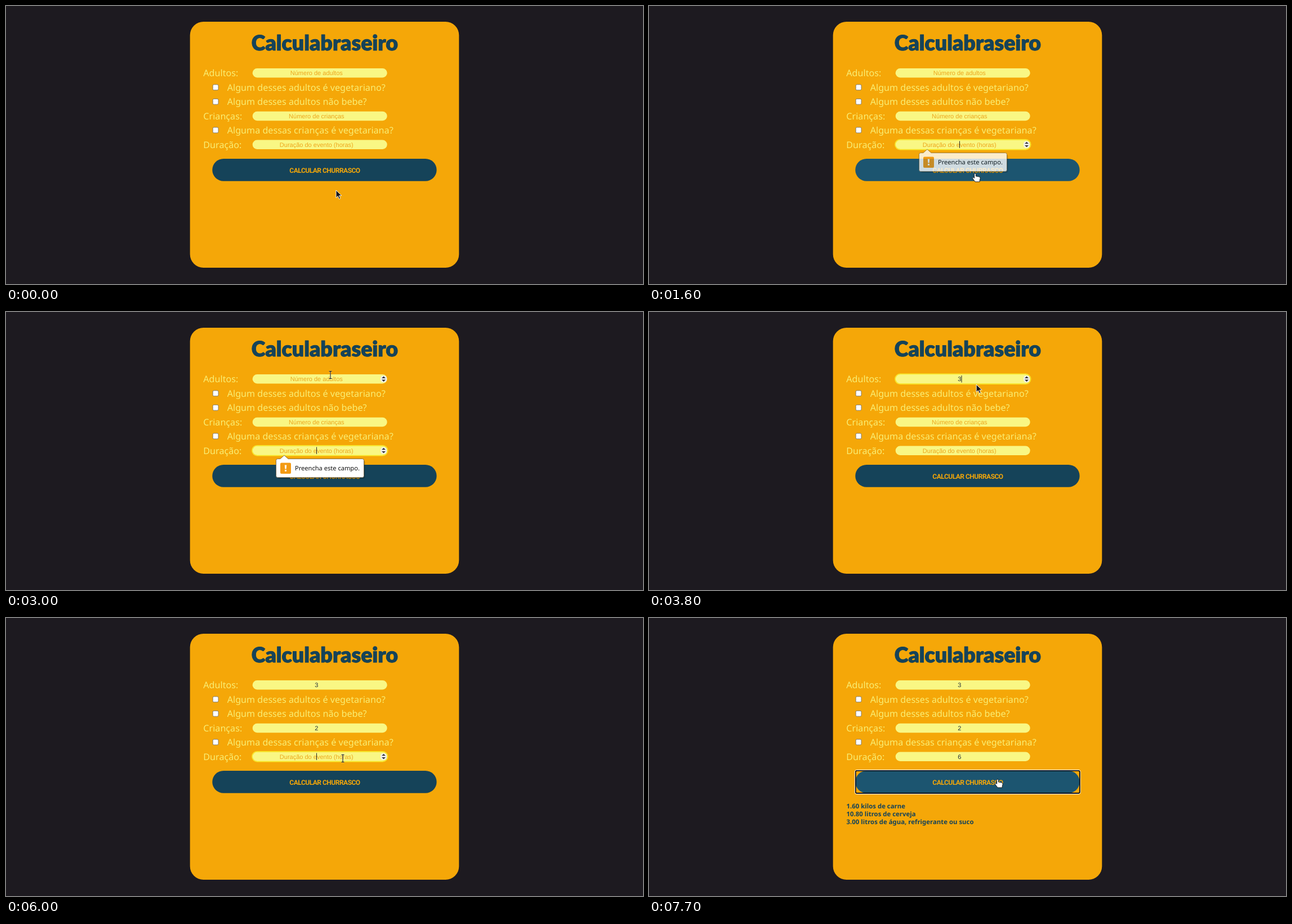
Animation of 1131 by 495 pixels, one loop 8 s. Source, as an HTML page:

```html
<!DOCTYPE html>
<html lang="pt">
<head>
<meta charset="utf-8">
<title>Calculabraseiro</title>
<style>
  html, body { margin: 0; width: 100%; height: 100%; overflow: hidden; background: #1d1a20; }
  svg { display: block; width: 100%; height: 100%; text-rendering: geometricPrecision; }
  .title { font: 900 37.5px Lato, sans-serif; fill: #154359; stroke: #154359; stroke-linejoin: round; text-anchor: middle; }
  .label { font: 16.15px "Noto Sans", sans-serif; fill: #f9ee74; }
  .value { font: 11px "Liberation Sans", Arial, sans-serif; text-anchor: middle; }
  .action { font: 700 12px Roboto, sans-serif; letter-spacing: -.5px; fill: #f5a708; text-anchor: middle; }
  .result { font: 700 11.4px "Noto Sans", sans-serif; fill: #154359; }
  .tip { font: 11.1px "Noto Sans", sans-serif; fill: #111; }
</style>
</head>
<body>
<svg viewBox="0 0 1131 495">
  <rect x="326.7" y="28" width="477.6" height="438" rx="24" fill="#f5a708"/>
  <text class="title" x="566" y="79">Calculabraseiro</text>
  <g id="form"></g>
  <rect id="button" x="366.3" y="272" width="398.3" height="39.8" rx="19.9"/>
  <text class="action" x="566" y="297">CALCULAR CHURRASCO</text>
  <g id="ring" fill="none">
    <rect x="365.5" y="270.5" width="400.5" height="43" rx="3" stroke="#fff"/>
    <rect x="366.8" y="271.8" width="398" height="40.2" rx="2.5" stroke="#101014" stroke-width="1.8"/>
  </g>
  <g id="results" class="result">
    <text x="350.5" y="339">1.60 kilos de carne</text>
    <text x="350.5" y="353">10.80 litros de cerveja</text>
    <text x="350.5" y="367">3.00 litros de água, refrigerante ou suco</text>
  </g>
  <g id="popup">
    <rect x="482" y="264" width="155.5" height="33" rx="4" opacity=".2"/>
    <path d="M482.5 261.5H487l7-6.3 7 6.3h131.5q3 0 3 3v27.2q0 3-3 3h-150q-3 0-3-3v-27.2q0-3 3-3z" fill="#fff" stroke="#6b5a3a" stroke-width=".8"/>
    <rect x="487" y="268.5" width="19" height="19.5" rx="2" fill="#f39a13"/>
    <path d="M494.8 272.5h3.4l-.6 7h-2.2zM495 281h3v2.8h-3z" fill="#fff"/>
    <text class="tip" x="513" y="282">Preencha este campo.</text>
  </g>
  <g id="cursor">
    <path id="arrow" d="M0 0V13.5l3.2-3 2.3 5.2 2.3-1-2.2-5H10z" fill="#16151a" stroke="#fff" stroke-width=".9"/>
    <path id="hand" d="M-1.4 1.2Q-1.2 0 0 0t1.4 1.5V5l5.8 1q2.2.5 2 3l-1 3.5V15H0l-4.4-6q-.8-1.8.8-2l2.2 1.4z" fill="#fff" stroke="#111" stroke-width=".9"/>
    <g id="beam" fill="none">
      <path d="M-2.5-6.5H2.5M0-6.5v13M-2.5 6.5H2.5" stroke="#fff" stroke-width="2.2" opacity=".5"/>
      <path d="M-2.5-6.5H2.5M0-6.5v13M-2.5 6.5H2.5" stroke="#111" stroke-width="1.1"/>
    </g>
  </g>
</svg>
<script>
const $ = id => document.getElementById(id);
const show = (el, on) => el.setAttribute('visibility', on ? 'visible' : 'hidden');
const within = (t, a, b) => t >= a && t < b;

const checks = [
  [144.8, 'Algum desses adultos é vegetariano?'],
  [170.3, 'Algum desses adultos não bebe?'],
  [221, 'Alguma dessas crianças é vegetariana?']
];
// y, label, placeholder, typed value, time typed, focus spans, caret spans
const fields = [
  [119.3, 'Adultos:', 'Número de adultos', '3', 3700, [[3300, 4400]], [[3300, 4300]]],
  [196, 'Crianças:', 'Número de crianças', '2', 5100, [[4400, 6000]], [[4400, 5700]]],
  [246.7, 'Duração:', 'Duração do evento (horas)', '6', 6700,
    [[1200, 3300], [6000, 7600]], [[1200, 1900], [2500, 3300], [6000, 6500], [6700, 7300]]]
];

$('form').innerHTML =
  checks.map(([y, text]) => `
    <rect x="367.2" y="${y - 4.9}" width="9.8" height="9.8" rx="2" fill="#fff" stroke="#767676" stroke-width=".9"/>
    <text class="label" x="392.7" y="${y + 5.7}">${text}</text>`).join('') +
  fields.map(([y, label], i) => `
    <text class="label" x="350.3" y="${y + 6}">${label}</text>
    <rect x="437.7" y="${y - 8.2}" width="239" height="16.4" rx="8.2" fill="#f9f784"/>
    <rect id="focus${i}" x="437" y="${y - 8.9}" width="240.6" height="17.8" rx="8.9" fill="none" stroke="#f8e92c" stroke-width="1.7"/>
    <text id="value${i}" class="value" x="551.3" y="${y + 4}"></text>
    <path id="caret${i}" stroke="#222" d="M0 ${y - 6.2}v12.4"/>
    <g id="spin${i}">
      <rect x="665" y="${y - 5.8}" width="11" height="11.6" rx="4.5" fill="#f1f1ec"/>
      <path d="M667 ${y - 1.4}l3.5-3.4 3.5 3.4zM667 ${y + 1.2}l3.5 3.4 3.5-3.4z" fill="#303034"/>
    </g>`).join('');

// time, x, y of the pointer
const path = [
  [700, 586, 328], [900, 579, 298], [2200, 579, 298], [2700, 584, 91],
  [2800, 581, 108], [3000, 576, 112], [3700, 576, 112], [4200, 602, 198],
  [5300, 602, 198], [5500, 596, 243], [5600, 596, 243], [5800, 598, 250],
  [6700, 598, 250], [7300, 619, 287]
];

function pointerAt(t) {
  const n = path.findIndex(k => k[0] > t);
  if (n < 1) return path[n ? path.length - 1 : 0].slice(1);
  const [a, b] = [path[n - 1], path[n]];
  const u = (t - a[0]) / (b[0] - a[0]);
  return [1, 2].map(i => a[i] + (b[i] - a[i]) * u);
}

function draw(t) {
  const [x, y] = pointerAt(t);
  const onButton = within(y, 272, 312);
  let onField = false;

  fields.forEach(([fy, , hint, typed, time, focus, caret], i) => {
    const hover = Math.abs(y - fy) < 8.5;
    const focused = focus.some(s => within(t, ...s));
    const full = t >= time;
    onField ||= hover;
    show($('focus' + i), focused);
    show($('spin' + i), focused || hover);
    show($('caret' + i), caret.some(s => within(t, ...s)));
    $('caret' + i).setAttribute('transform', `translate(${full ? 555 : 551.5})`);
    $('value' + i).textContent = full ? typed : hint;
    $('value' + i).setAttribute('fill', full ? '#25303a' : '#eda51c');
  });

  $('button').setAttribute('fill', onButton ? '#1c5570' : '#154359');
  show($('ring'), within(t, 1100, 1200) || t >= 7600);
  show($('results'), t >= 7700);
  show($('popup'), within(t, 1300, 3300));
  $('popup').setAttribute('opacity', Math.min(1, .04 + Math.max(0, t - 1300) / 400));

  $('cursor').setAttribute('transform', `translate(${x} ${y})`);
  const visible = !within(t, 3700, 3800) && !within(t, 5100, 5400);
  show($('beam'), visible && onField);
  show($('hand'), visible && onButton);
  show($('arrow'), visible && !onField && !onButton);
}

const start = performance.now();
function tick() {
  const t = (performance.now() - start) % 8000;
  draw(Math.floor(t / 100) * 100);
  requestAnimationFrame(tick);
}
tick();
</script>
</body>
</html>
```
